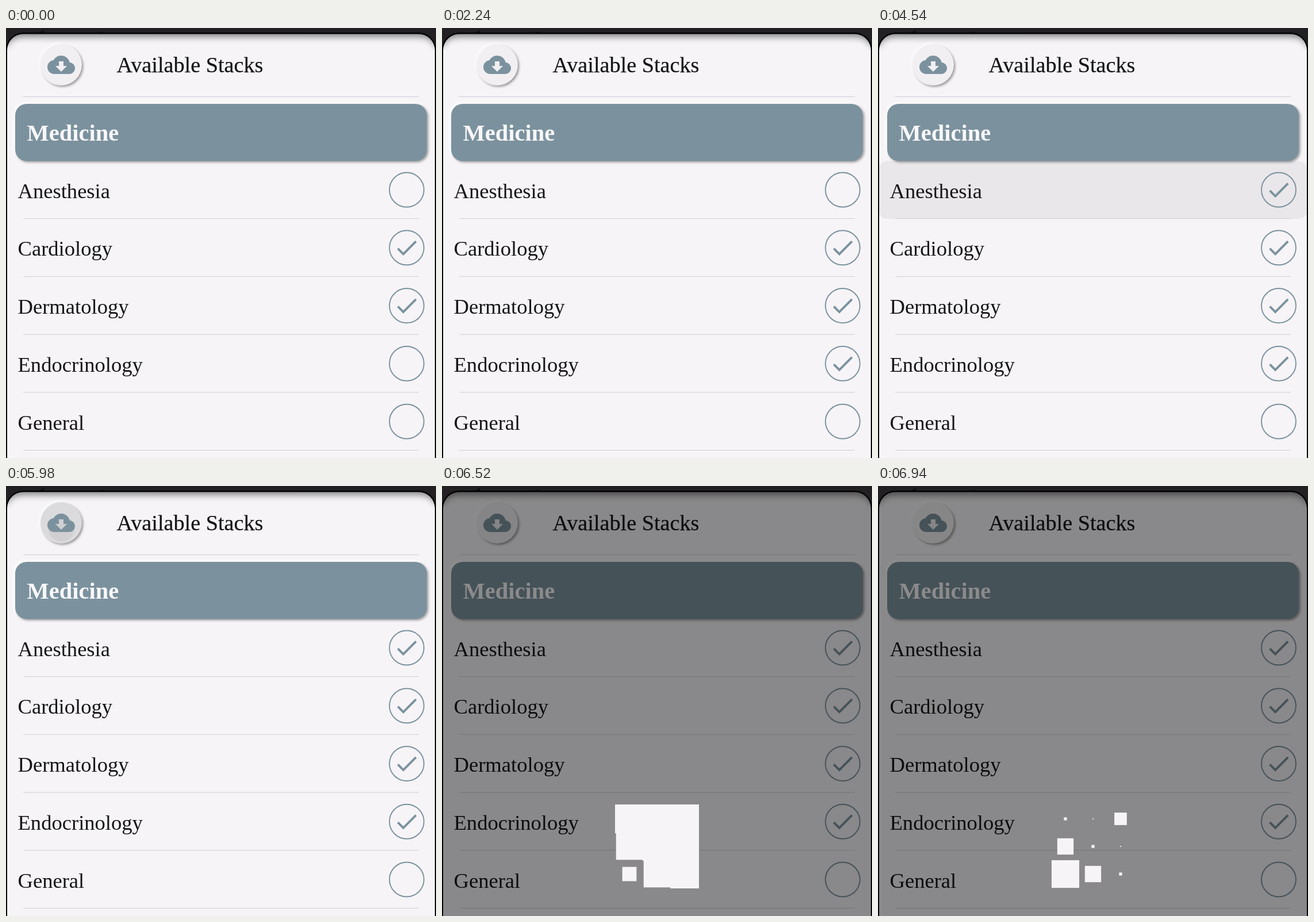
Animation, 748 px wide and 748 px high, one loop 6970 ms. Source, as an HTML page:

```html
<!DOCTYPE html>
<html lang="en">
<head>
<meta charset="utf-8">
<title>Available Stacks</title>
<style>
  html, body { margin: 0; width: 100%; height: 100%; overflow: hidden; background: #222022; }
  svg { display: block; width: 100vw; height: 100vh; }
  text { font-family: "Liberation Serif", "Times New Roman", serif; fill: #151417; }
</style>
</head>
<body>
<svg viewBox="0 0 748 748" xmlns="http://www.w3.org/2000/svg">
  <defs>
    <clipPath id="sheetClip"><path d="M1 760V38A29 28 0 0 1 30 10H718A29 28 0 0 1 747 38V760Z"/></clipPath>
    <filter id="soft" x="-20%" y="-40%" width="140%" height="180%"><feGaussianBlur stdDeviation="2"/></filter>
    <filter id="shade" filterUnits="userSpaceOnUse" x="-40" y="-40" width="828" height="160"><feGaussianBlur stdDeviation="7"/></filter>
  </defs>

  <rect width="748" height="748" fill="#222022"/>
  <path d="M55 9L66 3V9ZM160 9Q166 4 172 9Z" fill="#121113"/>
  <path d="M0 748V38A30 30 0 0 1 30 8H718A30 30 0 0 1 748 38V748Z" fill="#000"/>

  <g clip-path="url(#sheetClip)">
    <path d="M2 760V38A28 28 0 0 1 30 10.500H718A28 28 0 0 1 746 38V760Z" fill="#f6f4f7"/>
    <path d="M-6 30A36 24 0 0 1 30 7H718A36 24 0 0 1 754 30" fill="none" stroke="#000" stroke-width="13"
          opacity=".62" filter="url(#shade)"/>

    <circle cx="93" cy="61" r="36" fill="#fff" opacity=".5" filter="url(#soft)"/>
    <circle cx="98.500" cy="66.500" r="35.500" fill="#000" opacity=".42" filter="url(#soft)"/>
    <circle cx="96" cy="64" r="36" fill="#f1eff2"/>
    <g id="buttonInk"></g>
    <path transform="translate(72 40) scale(2)" fill="#7b929e" d="M19.35 10.04C18.67 6.59 15.64 4 12 4 9.11 4 6.6 5.64 5.35 8.04 2.34 8.36 0 10.91 0 14c0 3.31 2.69 6 6 6h13c2.76 0 5-2.24 5-5 0-2.64-2.05-4.78-4.65-4.96zM17 13l-5 5-5-5h3V9h4v4h3z"/>
    <text x="192.500" y="76.500" font-size="38.200" stroke="#151417" stroke-width=".25">Available Stacks</text>
    <path d="M30 119.500H718" stroke="#cfcdd1"/>

    <g id="rowInk"></g>
    <rect x="13" y="129" width="716" height="99" rx="20" fill="#fff" opacity=".7" filter="url(#soft)"/>
    <rect x="18.500" y="134.500" width="716" height="99" rx="20" fill="#000" opacity=".38" filter="url(#soft)"/>
    <rect x="16" y="132" width="716" height="99.500" rx="20" fill="#7b929e"/>
    <text x="36.500" y="196" font-size="40.500" font-weight="bold" style="fill:#f8f7f9">Medicine</text>
    <g id="rows"></g>

    <rect id="dim" y="10" width="748" height="738" fill="#000" opacity=".442"/>
    <g id="cubes" fill="#f6f4f7"></g>
  </g>
</svg>

<script>
const LOOP = 6970;
const SPLASH = 1750;   // time for a held splash to reach full size
const BURST = 530;     // the same after release
const FADE = 350;
const DIM_AT = 6290, CUBES_AT = 6310, WAVE_AT = 6367;
const HALF = 306, LAG = 102, CELL = 50, PITCH = 48;

const $ = id => document.getElementById(id);
const clamp = (v, lo = 0, hi = 1) => Math.min(hi, Math.max(lo, v));

function set(el, attrs) {
  for (const k in attrs) el.setAttribute(k, attrs[k]);
}
function add(parent, tag, attrs, text) {
  const el = document.createElementNS("http://www.w3.org/2000/svg", tag);
  set(el, attrs);
  if (text) el.textContent = text;
  parent.appendChild(el);
  return el;
}
const show = (el, on) => set(el, { visibility: on ? "visible" : "hidden" });

// List rows; checkAt is when the tick appears
const rows = [
  { name: "Anesthesia", checkAt: 4330 },
  { name: "Cardiology", checkAt: 0 },
  { name: "Dermatology", checkAt: 0 },
  { name: "Endocrinology", checkAt: 1550 },
  { name: "General", checkAt: Infinity }
];
rows.forEach((row, i) => {
  const g = add($("rows"), "g", { transform: `translate(0 ${i * 100.75})` });
  add(g, "text", { x: 20.5, y: 295.5, "font-size": 36.6 }, row.name);
  add(g, "circle", { cx: 697, cy: 281.5, r: 30, fill: "none", stroke: "#7b929e", "stroke-width": 1.9 });
  row.tick = add(g, "path", {
    transform: "translate(673.6 258.1) scale(1.95)", fill: "#7b929e",
    d: "M9 16.17L4.83 12l-1.42 1.41L9 19 21 7l-1.41-1.41z"
  });
  add(g, "path", { d: "M30 331.5H718", stroke: "#cfcdd1" });
});

// Ink presses: a highlight that fades in plus a growing splash
const presses = [
  { parent: "rowInk", x: 1, y: 533, w: 746, h: 101, rx: 15, cx: 600, cy: 594, reach: 614, down: 270, up: 1540 },
  { parent: "rowInk", x: 1, y: 231.5, w: 746, h: 100.5, rx: 15, cx: 596.5, cy: 306, reach: 614, down: 2690, up: 4320 },
  { parent: "buttonInk", x: 60, y: 28, w: 72, h: 72, rx: 36, cx: 96.5, cy: 74, reach: 62, down: 5340, up: 6200 }
];
presses.forEach((p, i) => {
  const box = { x: p.x, y: p.y, width: p.w, height: p.h, rx: p.rx };
  add(add(document.querySelector("defs"), "clipPath", { id: "ink" + i }), "rect", box);
  p.glow = add($(p.parent), "rect", box);
  const g = add($(p.parent), "g", { "clip-path": `url(#ink${i})` });
  p.splash = add(g, "circle", { cx: p.cx, cy: p.cy });
});

// Loader grid; the wave starts at the bottom left
const cubes = [];
for (let r = 0; r < 3; r++)
  for (let c = 0; c < 3; c++)
    cubes.push({ x: 326 + c * PITCH, y: 579 + r * PITCH, lag: (c - r + 2) * LAG, el: add($("cubes"), "rect") });

function drawPress(p, t) {
  const out = 1 - clamp((t - p.up) / FADE);
  const held = (Math.min(t, p.up) - p.down) / SPLASH;
  const burst = Math.max(0, t - p.up) / BURST;
  set(p.glow, { opacity: 0.09 * clamp((t - p.down) / FADE) * out });
  set(p.splash, { r: p.reach * clamp(held + burst), opacity: t < p.down ? 0 : 0.05 * out });
}

function drawCube(q, t) {
  const x = clamp((t - WAVE_AT - q.lag) / HALF, 0, 2);
  const size = CELL * (1 + Math.cos(Math.PI * x)) / 2;
  set(q.el, { x: q.x - size / 2, y: q.y - size / 2, width: size, height: size });
}

function draw(t) {
  rows.forEach(row => show(row.tick, t >= row.checkAt));
  presses.forEach(p => drawPress(p, t));
  show($("dim"), t >= DIM_AT);
  show($("cubes"), t >= CUBES_AT);
  cubes.forEach(q => drawCube(q, t));
}

function tick() {
  draw(performance.now() % LOOP);
  requestAnimationFrame(tick);
}
tick();
</script>
</body>
</html>
```
